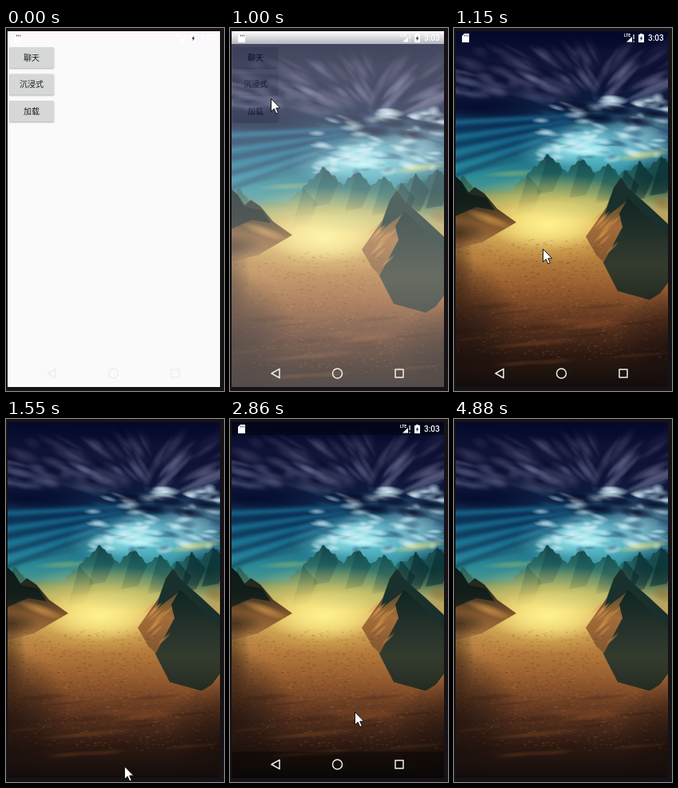
Recreate the animation shown at these times as an HTML page with a canvas. Size 273 by 454 pixels, loop 5740 ms.

```html
<!DOCTYPE html>
<html lang="zh-CN">
<head>
<meta charset="utf-8">
<style>
html, body { margin: 0; width: 100%; height: 100%; overflow: hidden; background: #171215; }
canvas { display: block; width: 273px; height: 454px; }
</style>
</head>
<body>
<canvas id="stage" width="273" height="454"></canvas>
<script>
const LOOP = 5740;
const W = 273, H = 454;
const SCREEN = { x: 2, y: 4, w: 266, h: 445 };
const SANS = '"Noto Sans CJK SC", "Noto Sans CJK", "Noto Sans", sans-serif';
const canvas = document.getElementById('stage');
const ctx = canvas.getContext('2d');

// first step, last step, number of steps, target x, target y
const MOVES = [
  [70, 70, 1, 203, 395],
  [150, 450, 5, 37, 68],
  [530, 600, 2, 51, 88],
  [1080, 1380, 5, 158, 425],
  [1550, 1700, 3, 138, 444],
  [2400, 2710, 5, 156, 366],
  [3180, 3410, 4, 131, 362],
  [3960, 4110, 3, 113, 209],
  [4190, 4270, 2, 120, 150],
  [4570, 4800, 4, 215, 411]
];

function stepped(t, first, last, count) {
  if (t < first) return 0;
  if (t >= last) return 1;
  return (Math.floor((t - first) / (last - first) * (count - 1) + .15) + 1) / count;
}

function pointerAt(t) {
  let [, , , x, y] = MOVES[0];
  for (const [first, last, count, toX, toY] of MOVES) {
    const k = 1 - (1 - stepped(t, first, last, count)) ** 1.6;
    x += (toX - x) * k;
    y += (toY - y) * k;
  }
  return [Math.round(x), Math.round(y)];
}

function barsAt(t) {
  if (t < 2310) return 1 - stepped(t, 1230, 1380, 3) ** 1.75;
  if (t < 3960) return 1 - (1 - stepped(t, 2480, 2710, 4)) ** 1.6;
  return 1 - stepped(t, 4030, 4270, 4) ** 1.75;
}

function seeded(seed) {
  return () => (seed = (seed * 16807) % 2147483647) / 2147483647;
}

function blob(g, x, y, rx, ry, rgb, alpha, turn = 0) {
  g.save();
  g.translate(x, y);
  g.rotate(turn);
  g.scale(rx, ry);
  const fill = g.createRadialGradient(0, 0, 0, 0, 0, 1);
  fill.addColorStop(0, `rgba(${rgb},${alpha})`);
  fill.addColorStop(.5, `rgba(${rgb},${alpha * .6})`);
  fill.addColorStop(1, `rgba(${rgb},0)`);
  g.fillStyle = fill;
  g.fillRect(-1, -1, 2, 2);
  g.restore();
}

// Colours are spread evenly from y0 to y1
function vertical(g, y0, y1, ...colors) {
  const fill = g.createLinearGradient(0, y0, 0, y1);
  colors.forEach((color, i) => fill.addColorStop(i / (colors.length - 1), color));
  return fill;
}

function shape(g, points, fill) {
  g.beginPath();
  points.split(' ').forEach(p => g.lineTo(...p.split(',')));
  g.closePath();
  g.fillStyle = fill;
  g.fill();
}

function paintSky(g, rnd) {
  g.fillStyle = vertical(g, 4, 230, '#050a2c', '#121638', '#0c1a3e', '#12506f', '#2d8b98', '#7da678');
  g.fillRect(0, 0, W, 235);

  // Cloud streaks converge on the light behind the clouds
  for (let i = 0; i < 150; i++) {
    const x = rnd() * 290 - 10, y = 22 + rnd() * 70;
    const turn = Math.atan2(115 - y, 185 - x) * .75;
    const light = rnd() > .42;
    const mid = 1 - Math.abs(y - 62) / 65;
    blob(g, x, y, 10 + rnd() * 22, 3 + rnd() * 6, light ? '126,124,164' : '8,10,42',
      (light ? .36 : .42) * mid, x > 185 ? turn - 2.3 : turn);
  }
  blob(g, 30, 100, 85, 15, '4,9,43', .85, .05);
  blob(g, 150, 8, 200, 22, '4,7,40', .8);

  blob(g, 175, 150, 100, 38, '118,220,232', .9);
  blob(g, 150, 145, 48, 25, '180,245,250', .7, -.3);
  blob(g, 235, 135, 55, 40, '155,205,220', .65);

  g.save();
  g.filter = 'blur(2px)';
  for (let i = 0; i < 8; i++) {
    const y = 116 + i * 10;
    shape(g, `150,${108 + i * 3} -8,${y} -8,${y + 5} 140,${113 + i * 3}`,
      i % 2 ? 'rgba(8,38,82,.65)' : 'rgba(32,140,185,.6)');
  }
  g.restore();

  for (let i = 0; i < 110; i++) {
    const light = i % 9 > 3;
    blob(g, 108 + rnd() * 165, 86 + rnd() * 78, 6 + rnd() * 13, 2 + rnd() * 4,
      light ? '218,241,249' : '38,72,108', light ? .62 : .45, -.15 + rnd() * .5);
  }
  for (let i = 0; i < 5; i++) {
    blob(g, 158 + i * 23, 99 + (i % 2) * 12 + i * 2, 27, 7, '8,16,45', .95, .15);
  }
  blob(g, 199, 91, 20, 7, '224,250,255', .95);
  blob(g, 165, 154, 38, 7, '210,255,255', .85, .1);
  blob(g, 238, 159, 38, 6, '218,218,125', .7, -.15);
  blob(g, 75, 182, 42, 5, '145,178,105', .6, -.05);
  blob(g, 45, 171, 55, 6, '24,92,112', .6, -.2);
}

function paintRange(g) {
  const peaks = [[10, 184], [92, 184], [118, 158], [159, 163], [192, 169], [214, 177], [232, 167], [260, 160]];
  g.beginPath();
  g.moveTo(0, 245);
  for (let x = 0; x <= W; x += 2) {
    const top = Math.min(203, ...peaks.map(([px, py]) => py + Math.abs(x - px) * .95));
    g.lineTo(x, top + Math.sin(x * .8) * 1.5 + Math.sin(x * .37));
  }
  g.lineTo(W, 245);
  g.fillStyle = vertical(g, 158, 238, '#174a52', '#2b716b', '#7a9a68', '#c4b268');
  g.fill();

  for (const [x, y] of peaks) {
    shape(g, `${x},${y} ${x + 18},${y + 20} ${x + 6},${y + 46} ${x - 15},${y + 50} ${x - 6},${y + 20}`,
      x > 200 ? 'rgba(5,36,42,.5)' : 'rgba(8,56,65,.32)');
  }
  blob(g, 255, 190, 50, 32, '5,36,42', .6);
}

function paintLand(g, rnd) {
  paintRange(g);

  g.fillStyle = vertical(g, 206, 449, 'rgba(180,170,93,0)', '#c09b55', '#b9803f', '#93592e',
    '#5d3520', '#2d1911', '#120d0c');
  g.fillRect(0, 206, W, 248);

  blob(g, 118, 238, 122, 56, '255,220,105', .75);
  blob(g, 118, 246, 76, 32, '255,244,145', .95);
  blob(g, 150, 225, 72, 15, '205,209,126', .5);

  shape(g, '0,184 10,193 17,207 26,199 38,207 54,226 78,243 35,268 0,277',
    vertical(g, 185, 275, '#0c292d', '#2c2b20', '#84582e', '#a3723f'));
  shape(g, '0,184 10,193 20,208 40,212 51,228 28,224 0,236', 'rgba(8,24,23,.75)');
  blob(g, 44, 239, 32, 7, '222,158,77', .65, .35);
  blob(g, 5, 256, 36, 15, '38,30,21', .6);

  shape(g, '209,187 218,200 244,223 270,247 270,312 205,314 177,282 165,261 191,224 200,200',
    vertical(g, 187, 310, '#15383a', '#5a4a2d', '#a46d39', '#8c5c32', '#74502e'));
  shape(g, '209,187 218,200 244,223 270,247 270,264 218,215 187,239 200,200', '#19302c');
  shape(g, '218,213 270,263 270,316 258,332 245,340 205,329 187,294 211,249 207,232',
    vertical(g, 212, 340, '#0f2423', '#22302a', '#343b2d', '#252b23'));
  for (let i = 0; i < 12; i++) {
    blob(g, 179 + rnd() * 22, 235 + rnd() * 42, 12, 2, '226,158,79', .55, -.75);
  }
  blob(g, 262, 219, 16, 10, '144,110,58', .65, .4);

  // Grain of the sand
  for (let i = 0; i < 1700; i++) {
    const x = rnd() * W, y = 264 + rnd() * 150;
    if (x > 187 && y < 338) continue;
    g.fillStyle = rnd() > .5 ? 'rgba(233,170,95,.17)' : 'rgba(48,23,10,.2)';
    g.fillRect(x, y, 1 + rnd() * 3, 1);
  }
  for (let i = 0; i < 26; i++) {
    blob(g, rnd() * W, 335 + rnd() * 90, 20 + rnd() * 28, 2 + rnd() * 3,
      i % 2 ? '160,91,42' : '32,17,12', .25, -.08);
  }
  blob(g, 0, 370, 80, 85, '15,9,9', .62);
  blob(g, 270, 400, 70, 75, '18,11,10', .55);
  blob(g, 0, 300, 26, 60, '35,22,16', .5);
}

function makeLandscape() {
  const layer = document.createElement('canvas');
  layer.width = W;
  layer.height = H;
  const g = layer.getContext('2d');
  const rnd = seeded(4217);
  paintSky(g, rnd);
  paintLand(g, rnd);
  return layer;
}

const landscape = makeLandscape();

function button(label, y) {
  ctx.save();
  ctx.shadowColor = 'rgba(0,0,0,.3)';
  ctx.shadowBlur = 2;
  ctx.shadowOffsetY = 1;
  ctx.fillStyle = '#d6d7d7';
  ctx.beginPath();
  ctx.roundRect(4, y, 56, 26, 1.5);
  ctx.fill();
  ctx.restore();
  ctx.fillStyle = '#1c1c1c';
  ctx.font = `500 10px ${SANS}`;
  ctx.textAlign = 'center';
  ctx.fillText(label, 32, y + 16.7);
}

function drawMenu() {
  ctx.fillStyle = '#fafafa';
  ctx.fillRect(SCREEN.x, SCREEN.y, SCREEN.w, SCREEN.h);
  ctx.fillStyle = vertical(ctx, 4, 20, '#fff5fd', '#fafafa');
  ctx.fillRect(SCREEN.x, SCREEN.y, SCREEN.w, 16);
  ['聊天', '沉浸式', '加载'].forEach((label, i) => button(label, 24 + i * 33.5));
}

function drawStatus() {
  shape(ctx, '13,7 19,7 19,18 10,18 10,10', '#fff');
  ctx.fillStyle = 'rgba(20,25,60,.75)';
  for (let x = 13; x < 18; x += 2) ctx.fillRect(x, 8.5, 1, 2);

  ctx.fillStyle = '#fff';
  ctx.textAlign = 'left';
  ctx.font = 'bold 5px Roboto, sans-serif';
  ctx.fillText('LTE', 213, 11);
  shape(ctx, '223,11 223,17.5 216,17.5', '#fff');
  ctx.fillRect(224.5, 8, 1.2, 6);
  ctx.fillRect(224.5, 16, 1.2, 1.5);
  ctx.fillRect(233, 7, 3, 2);
  ctx.fillRect(231, 8, 7, 10);
  shape(ctx, '235.5,9.5 232.5,13.5 234.5,13.5 233.5,16.5 236.5,12.5 234.7,12.5', '#192044');
  ctx.fillStyle = '#fff';
  ctx.font = '500 10px Roboto, sans-serif';
  ctx.fillText('3:03', 243, 16.3);
}

function drawNav(color) {
  ctx.strokeStyle = color;
  ctx.lineWidth = 1.5;
  ctx.lineJoin = 'round';
  ctx.beginPath();
  ctx.moveTo(52, 432);
  ctx.lineTo(62, 426.3);
  ctx.lineTo(62, 437.7);
  ctx.closePath();
  ctx.moveTo(140.5, 432);
  ctx.arc(134.5, 432, 6, 0, Math.PI * 2);
  ctx.rect(207, 427, 10, 10);
  ctx.stroke();
}

function drawBar(y, height, slide, scrim, paint) {
  ctx.save();
  ctx.translate(0, slide);
  ctx.fillStyle = `rgba(0,0,0,${scrim})`;
  ctx.fillRect(SCREEN.x, y, SCREEN.w, height);
  paint();
  ctx.restore();
}

function drawBars(shown, scrim, navColor) {
  if (!shown) return;
  drawBar(4, 16, -16 * (1 - shown), scrim, drawStatus);
  drawBar(416, 33, 33 * (1 - shown), scrim, () => drawNav(navColor));
}

function drawPointer(x, y) {
  ctx.save();
  ctx.translate(x + .5, y + .5);
  ctx.lineWidth = 1;
  ctx.lineJoin = 'miter';
  ctx.strokeStyle = '#111';
  shape(ctx, '0,0 0,16 3.7,12.6 6.3,18.5 8.8,17.4 6.2,11.6 11.2,11.6', '#fff');
  ctx.stroke();
  ctx.restore();
}

function draw(t) {
  ctx.fillStyle = '#171215';
  ctx.fillRect(0, 0, W, H);
  ctx.save();
  ctx.beginPath();
  ctx.rect(SCREEN.x, SCREEN.y, SCREEN.w, SCREEN.h);
  ctx.clip();

  if (t < 1150) drawMenu();
  if (t >= 1000) {
    const rise = t < 1080 ? 16 : t < 1150 ? 4 : 0;
    if (rise) {
      ctx.fillStyle = vertical(ctx, 4, 20, '#fff', '#b5b4bd');
      ctx.fillRect(SCREEN.x, SCREEN.y, SCREEN.w, rise);
    }
    ctx.globalAlpha = rise === 16 ? .74 : rise ? .95 : 1;
    // Keep the rising layer below its own top edge
    ctx.drawImage(landscape, 0, 4, W, H - 4, 0, 4 + rise, W, H - 4);
    ctx.globalAlpha = 1;
  }
  drawBars(barsAt(t), t >= 2400 ? .4 : 0, t < 1000 ? '#eeeeee' : '#edf2e9');
  ctx.restore();

  if (t >= 70 && t < 4880) drawPointer(...pointerAt(t));
}

const start = performance.now();
function tick() {
  draw((performance.now() - start) % LOOP);
  requestAnimationFrame(tick);
}
tick();
</script>
</body>
</html>
```
